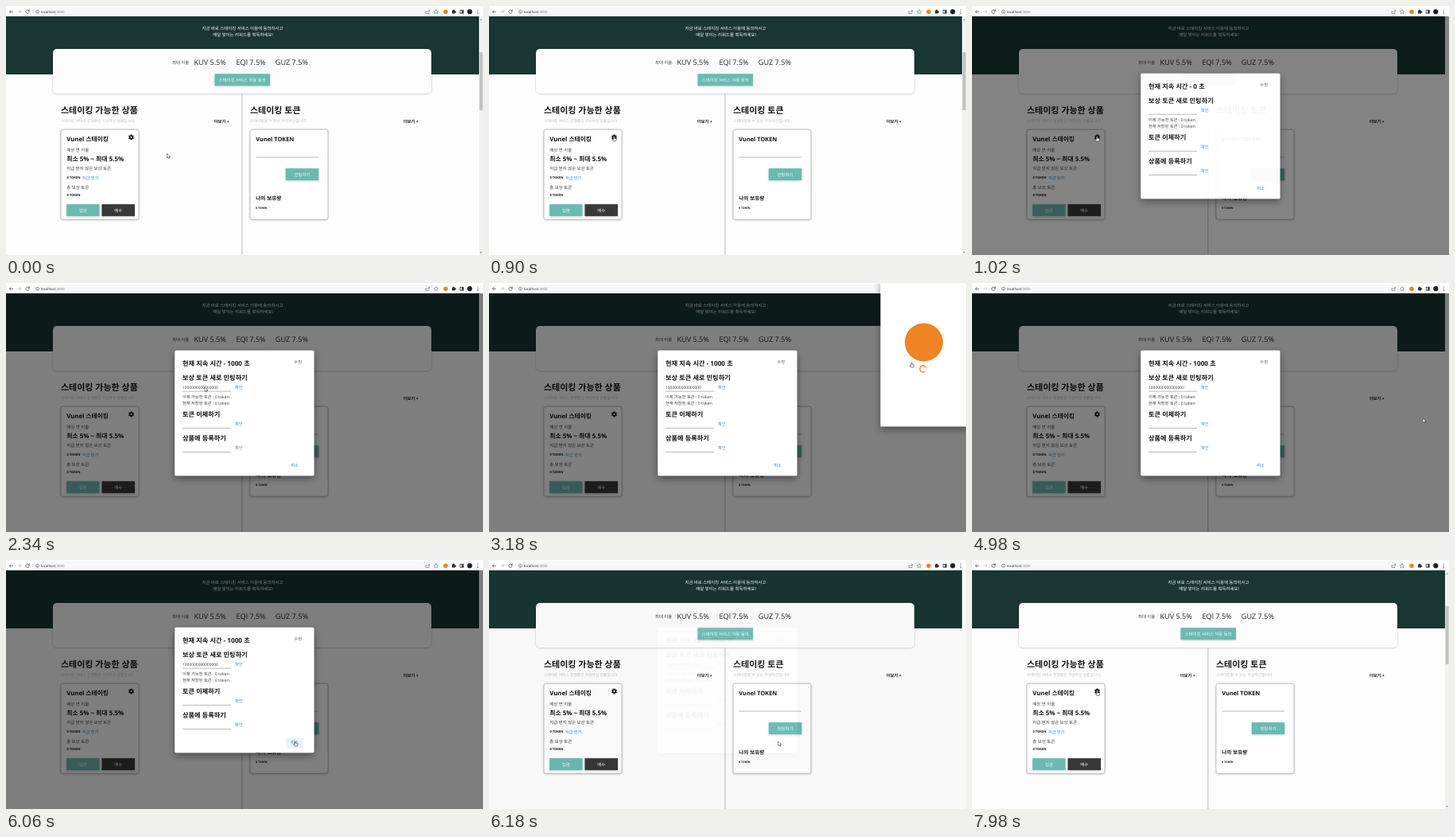
These frames come from a looping animation (600x313 px, 8000 ms). An HTML page:

```html
<!DOCTYPE html>
<html>
<head>
<meta charset="utf-8">
<title>Staking page</title>
<style>
  html, body { margin: 0; width: 100%; height: 100%; overflow: hidden; background: #fff; }
  svg { display: block; width: 100%; height: 100%; }
  text { font-family: "Open Sans", "Noto Sans CJK KR", "Noto Sans CJK", sans-serif; text-rendering: geometricPrecision; white-space: pre; }
</style>
</head>
<body>
<svg id="stage" viewBox="0 0 600 313" preserveAspectRatio="none"></svg>
<script>
const TEAL = '#6abab2', BLUE = '#2f88d0', INK = '#111', BODY = '#3a3a3a', ORANGE = '#f08322';
const LOOP = 8000, STEP = 60;

const text = (x, y, size, str, fill = BODY, extra = '') =>
  `<text x="${x}" y="${y}" font-size="${size}" fill="${fill}" ${extra}>${str}</text>`;
const bold = (x, y, size, str, extra = '') => text(x, y, size, str, INK, 'font-weight="700" ' + extra);
const centered = (x, y, size, str, fill) => text(x, y, size, str, fill, 'text-anchor="middle"');
const rightText = (x, y, size, str, fill) => text(x, y, size, str, fill, 'text-anchor="end"');
const rect = (x, y, w, h, fill, extra = '') =>
  `<rect x="${x}" y="${y}" width="${w}" height="${h}" fill="${fill}" ${extra}/>`;
const circle = (x, y, r, fill, extra = '') => `<circle cx="${x}" cy="${y}" r="${r}" fill="${fill}" ${extra}/>`;
const path = (d, stroke, width = 0.8, fill = 'none') =>
  `<path d="${d}" stroke="${stroke}" stroke-width="${width}" fill="${fill}"/>`;
const group = (id, content) => `<g id="${id}">${content}</g>`;
const button = (x, y, w, label, fill = TEAL) =>
  rect(x, y, w, 15, fill, 'filter="url(#soft)"') + centered(x + w / 2, y + 9.6, 5.4, label, '#fff');
const card = x => rect(x, 155.3, 98, 113, '#fff', 'rx="2.5" stroke="#aaa" stroke-width=".7" filter="url(#soft)"');
const spinner = (id, x, y, r, width) =>
  `<g transform="translate(${x} ${y})">${circle(0, 0, r, 'none', `stroke="#eadfd6" stroke-width="${width}"`)}
  <g id="${id}">${path(`M0 ${-r}A${r} ${r} 0 1 1 ${-r} 0`, ORANGE, width)}</g></g>`;

function gear(x, y) {
  let teeth = '';
  for (let a = 0; a < 360; a += 60) teeth += rect(-0.9, -3.5, 1.8, 2, INK, `transform="rotate(${a})"`);
  return `<g transform="translate(${x} ${y})">${teeth}${circle(0, 0, 1.9, 'none', `stroke="${INK}" stroke-width="1.5"`)}</g>`;
}

const toolbar = rect(0, 0, 600, 13, '#fff') + rect(33, 2, 514, 10, '#f6f7f8', 'rx="5"') +
  path('M9 7.2H4.5M6.5 5L4.3 7.2L6.5 9.4', '#555') +
  path('M14.5 7.2H19M17 5L19.2 7.2L17 9.4', '#bbb') +
  path('M28.8 5.9A2.2 2.2 0 1 0 29.2 7.6M29.3 4.4V6.4H27.3', '#555') +
  circle(39.5, 7.2, 2, 'none', 'stroke="#555" stroke-width=".6"') + path('M39.5 6.8V8.4', '#555', 0.6) +
  text(44, 9, 4.4, 'localhost<tspan fill="#777">:3000</tspan>', '#222') +
  path('M529 6.5H528V9.5H532V8M529.5 8Q530 6 533 6M531.5 4.5L533 6L531.5 7.5', '#666', 0.6) +
  path('M541 4.4L541.8 6.3L543.7 6.5L542.3 7.8L542.7 9.7L541 8.7L539.3 9.7L539.7 7.8L538.3 6.5L540.2 6.3Z', '#666', 0.5) +
  circle(553, 7.2, 2.8, ORANGE) +
  rect(561, 5.6, 4, 4, '#333', 'rx=".5"') + circle(563, 5.4, 1, '#333') + circle(565.3, 7.6, 1, '#333') +
  rect(571.2, 5.2, 4, 4, 'none', 'stroke="#333" stroke-width=".8"') + rect(573.3, 5.2, 2, 4, '#333') +
  circle(583.3, 7.2, 3.1, '#17242c') +
  [5, 7.2, 9.4].map(y => circle(593.5, y, 0.55, '#444')).join('');

const page = rect(0, 13, 600, 300, '#fdfdfd') + rect(0, 13, 595, 73, '#193632') +
  centered(297.5, 30, 5.45, '지금 바로 스테이킹 서비스 이용에 동의하시고', '#fff') +
  centered(298, 38, 5.45, '매달 쌓이는 리워드를 획득하세요!', '#fff') +
  rect(59, 54, 476, 56, '#fdfdfd', 'rx="5" filter="url(#soft)"') +
  text(209, 73, 5.4, '최대 이율') +
  text(236.5, 74, 9.1, 'KUV 5.5%', '#222') + text(289.5, 74, 9.1, 'EQl 7.5%', '#222') + text(338.8, 74, 9.1, 'GUZ 7.5%', '#222') +
  button(262.5, 85.3, 69.5, '스테이킹 서비스 이용 동의') +
  rect(296.4, 110, 1, 203, '#b9bdbd') +
  bold(69, 135.3, 11, '스테이킹 가능한 상품') +
  text(69, 146, 4.75, '스테이킹 서비스 진행중인 가상자산 상품입니다.', '#bbb') +
  bold(262, 147, 5.2, '더보기 +') +
  bold(307, 135.3, 11, '스테이킹 토큰') +
  text(307, 146, 4.85, '스테이킹할 수 있는 가상자산입니다.', '#bbb') +
  bold(500, 147, 5.2, '더보기 +') +
  card(69) + bold(76.3, 169.7, 7.75, 'Vunel 스테이킹') + gear(157.5, 165) +
  text(76.3, 183.2, 5.45, '예상 연 이율') +
  bold(76.3, 195.3, 7.9, '최소 5% ~ 최대 5.5%') +
  text(76.3, 206.3, 5.45, '지급 받지 않은 보상 토큰') +
  bold(76.5, 217.4, 4, '0 TOKEN') + text(96, 217.7, 5.2, '지급 받기', BLUE) +
  text(76.3, 230, 5.45, '총 보상 토큰') + bold(76.5, 239, 4, '0 TOKEN') +
  button(76.2, 249.2, 41.3, '입금') + button(120.5, 249.2, 41.5, '매수', '#383838') +
  card(307) + bold(314.3, 169.7, 7.4, 'Vunel TOKEN') +
  rect(314.3, 189.7, 78.5, 0.7, '#999') +
  button(351.8, 204.2, 41.5, '민팅하기') +
  bold(314.3, 243.7, 6.6, '나의 보유량') + bold(314.3, 255, 3.4, '0 TOKEN');

const scrollbar = rect(595, 13, 5, 300, '#f1f1f1') + rect(595.6, 58, 4, 73, '#c1c1c1') +
  path('M596.3 18L597.5 16.3L598.7 18Z', 'none', 0, '#777') + path('M596.3 309L597.5 310.7L598.7 309Z', 'none', 0, '#777');

const field = y => rect(222, y, 61, 0.6, '#8a8a8a') + text(288, y - 2.8, 5.3, '확인', BLUE);
const modal = rect(0, 13, 600, 300, '#000', 'opacity=".5"') +
  rect(212.3, 84.7, 175.2, 157.6, '#fff', 'rx="1.6" filter="url(#deep)"') +
  bold(222, 104, 8.2, '', 'id="duration"') + text(362.3, 101, 5.3, '수정', '#555') +
  bold(222, 122, 8.2, '보상 토큰 새로 민팅하기') + text(222, 133, 4.92, '', '#333', 'id="amount"') + field(135.8) +
  text(222, 144.5, 5.25, '이체 가능한 토큰 : 0 token') + text(222, 152.6, 5.25, '현재 저장된 토큰 : 0 token') +
  bold(222, 168.4, 8.2, '토큰 이체하기') + field(182) +
  bold(222, 198.2, 8.2, '상품에 등록하기') + field(212) +
  rect(352.5, 223.5, 21.5, 13, '#eaf3fb', 'rx="1.5" id="cancelHover"') + centered(363, 230.7, 5.3, '취소', BLUE);

const confirmView = circle(572, 3, 1.3, '#7a5be0') + text(575, 4.4, 3.8, 'Vantor') +
  circle(501.5, 15.5, 3.8, ORANGE) + text(508.5, 17, 4.2, 'Account 1') +
  circle(546, 15.5, 3, '#fff', 'stroke="#ccc" stroke-width=".5"') + path('M544.8 15.5H547.2M546.4 14.6L547.3 15.5L546.4 16.4', '#777', 0.5) +
  circle(559, 15.5, 3.8, '#6fa33c') + text(567.5, 17, 4.2, '0x52…31d9') +
  rect(493, 23, 101, 0.5, '#ddd') +
  rect(498, 27, 93, 21, '#e6f1fb', 'rx="2" stroke="#4d96e0" stroke-width=".7"') +
  text(502, 36, 4, '이 계약과 함께 작동하는 모든 요청을') + text(502, 42.5, 4, '확인한 후 진행하세요.') +
  text(498.5, 59.5, 4.2, '세부 정보', '#0376c9') + text(524, 59.5, 4.2, '데이터', '#777') + text(544, 59.5, 4.2, '16진수', '#777') +
  rect(493, 64.2, 101, 0.5, '#ddd') + rect(497, 63.8, 19, 0.9, '#0376c9') +
  rightText(588, 81, 3.8, '0.00020147', '#777') +
  text(500, 89.5, 5, '예상 가스 요금', INK) + rightText(588, 93.5, 4.6, '0.000201 VANTO', INK) +
  text(500, 100.5, 3.8, '사이트 제안', '#777') + text(500, 107, 3.8, '30초 후 예상', '#3aa655') +
  rightText(588, 105, 4, '최대 요금: 0.000201', '#777') +
  rect(498, 120, 92, 0.5, '#ddd') +
  rightText(588, 129, 3.8, '0.00020147', '#777') +
  text(500, 136.5, 5, '합계', INK) + rightText(588, 137.5, 4.6, '0.00020147 VANTO', INK) +
  text(500, 147, 3.8, '금액 + 가스 요금', '#777') + rightText(588, 147, 3.8, '최대 금액: 0.000201', '#777') +
  rect(498, 160, 43.5, 14, '#fff', 'rx="7" stroke="#0376c9" stroke-width=".7"') + centered(519.7, 169, 4.8, '거부', '#0376c9') +
  rect(546.5, 160, 43, 14, '#0376c9', 'rx="7"') + centered(568, 169, 4.8, '확인', '#fff') +
  rect(594, 0, 6, 180, '#f1f1f1') + rect(594.8, 88, 4.4, 80, '#c1c1c1');

const popup = rect(492.5, -4, 110, 184.3, '#fff', 'filter="url(#deep)"') +
  group('loadView', circle(547, 74.5, 24, ORANGE) + spinner('spinSmall', 546, 108, 4, 1.3)) +
  group('confirmView', confirmView) +
  group('busyView', rect(492.5, 0, 108, 180.3, '#fff', 'opacity=".75"') + spinner('spinBig', 546, 89.5, 8, 2.2));

const cursor = group('arrow', path('M0 0V5.4L1.3 4.2L2.2 6.2L3.1 5.8L2.2 3.9H4Z', '#222', 0.5, '#fff')) +
  group('hand', path('M-.6 .3Q0-.5 .6 .3V2.2L2.6 2.6Q3.3 2.8 3.2 3.6L2.7 6H-.6L-2.3 3.8Q-2 3-.6 4Z', '#222', 0.55, '#fff'));

const stage = document.getElementById('stage');
stage.innerHTML = `<defs>
  <filter id="soft" x="-20%" y="-20%" width="140%" height="150%"><feDropShadow dx="0" dy=".5" stdDeviation=".8" flood-opacity=".25"/></filter>
  <filter id="deep" x="-20%" y="-20%" width="140%" height="140%"><feDropShadow dx="0" dy="3.5" stdDeviation="5" flood-opacity=".42"/></filter>
  </defs>` + group('page', page) + group('scrollbar', scrollbar) + group('modal', modal) +
  toolbar + group('popup', popup) + group('cursor', cursor);

const $ = id => document.getElementById(id);
const show = (id, visible) => $(id).setAttribute('visibility', visible ? 'inherit' : 'hidden');
const clamp = v => Math.max(0, Math.min(1, v));
const between = (t, a, b) => t >= a && t < b;

// Pointer stops: time, x, y
const stops = [
  [0, 202.5, 185.5], [120, 202.5, 185.5], [660, 157, 164], [1080, 157, 164], [1680, 250, 131], [2340, 250, 131],
  [2580, 292, 130.5], [2760, 292, 130.5], [3120, 531.5, 100], [3600, 531.5, 100], [4140, 567, 170], [5160, 567, 170],
  [5820, 363.8, 228], [6300, 363.8, 228], [7020, 202.5, 185.5], [7560, 157.5, 164.5], [8000, 157.5, 164.5]
];

function pointerAt(t) {
  const i = stops.findIndex((s, n) => n > 0 && t <= s[0]);
  const [t0, x0, y0] = stops[i - 1], [t1, x1, y1] = stops[i];
  const p = (t - t0) / (t1 - t0), e = p * p * (3 - 2 * p);
  return [x0 + (x1 - x0) * e, y0 + (y1 - y0) * e];
}

function draw(now) {
  const t = Math.floor((now % LOOP) / STEP) * STEP;

  const open = clamp((t - 900) / 125) * (1 - clamp((t - 6060) / 125));
  $('modal').setAttribute('opacity', open);
  show('scrollbar', open === 0);
  $('duration').textContent = `현재 지속 시간 - ${t < 1260 ? 0 : 1000} 초`;
  const typed = Math.round(16 * clamp((t - 1800) / 480));
  $('amount').textContent = '1000000000000000'.slice(0, typed);
  show('cancelHover', between(t, 5760, 6240));

  const popupOpen = between(t, 2820, 4800);
  show('popup', popupOpen);
  show('loadView', popupOpen && t < 3540);
  show('confirmView', popupOpen && t >= 3540);
  show('busyView', popupOpen && t >= 4260);
  for (const id of ['spinSmall', 'spinBig']) $(id).setAttribute('transform', `rotate(${t * 0.5})`);

  const [x, y] = pointerAt(t);
  $('cursor').setAttribute('transform', `translate(${x} ${y})`);
  const hand = between(t, 600, 1140) || between(t, 2520, 3600) || between(t, 4080, 4320) ||
    between(t, 5760, 6120) || t >= 7500;
  show('hand', hand);
  show('arrow', !hand);
}

const start = performance.now();
(function tick() {
  draw(performance.now() - start);
  requestAnimationFrame(tick);
})();
</script>
</body>
</html>
```
